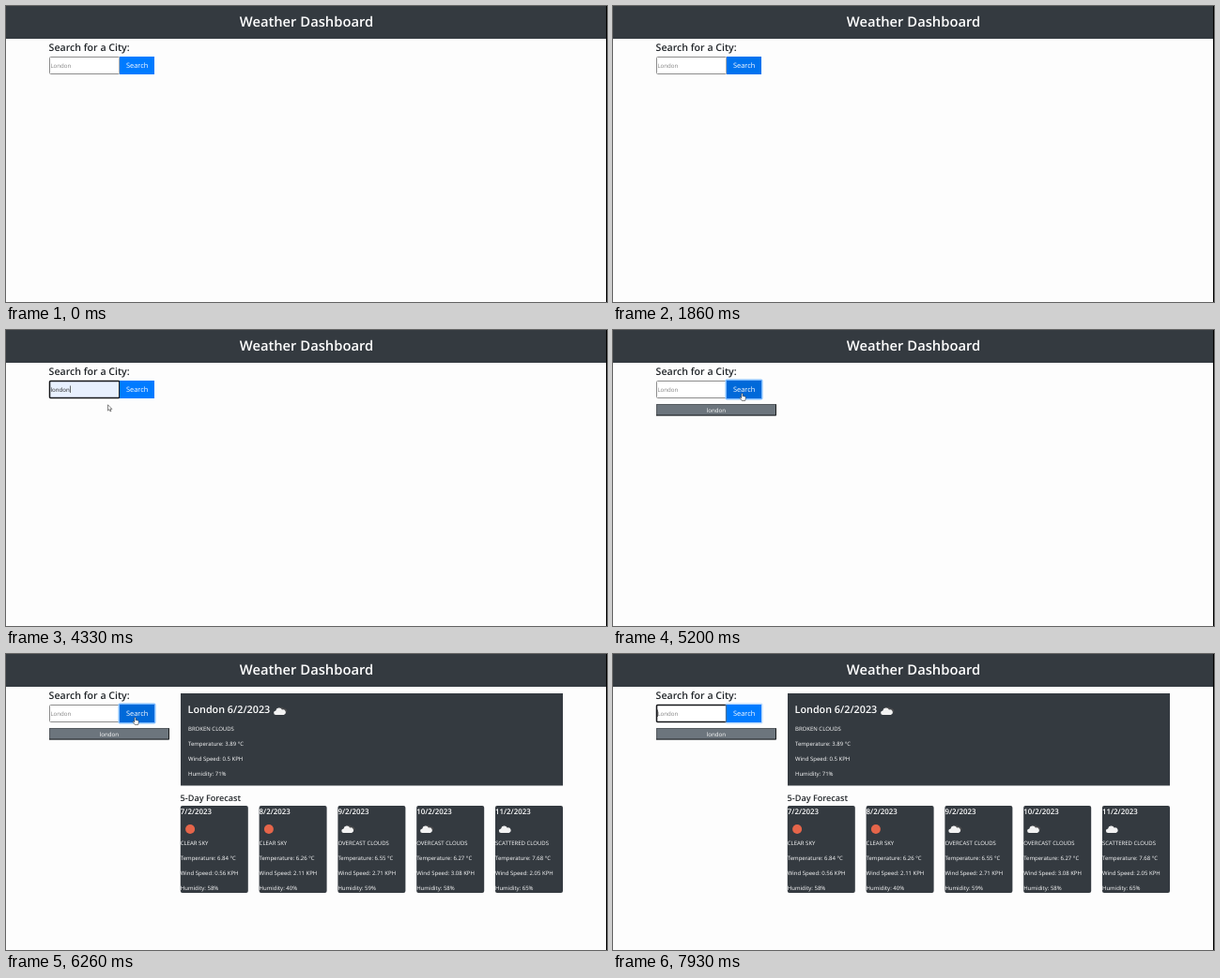
Animation of 640x316 px, one loop 8000 ms. Source, as an HTML page:

```html
<!DOCTYPE html>
<html lang="en">
<head>
<meta charset="utf-8">
<title>Weather Dashboard</title>
<style>
  html, body { margin: 0; width: 100%; height: 100%; overflow: hidden; background: #fdfdfd; }
  svg { display: block; width: 100%; height: 100%; }
  text { font-family: "Open Sans", "Noto Sans", sans-serif; font-size: 6px; fill: #fff; text-rendering: geometricPrecision; white-space: pre; }
  .bold { font-weight: 600; }
  .dark { fill: #212529; }
  .panel { fill: #343a40; }
</style>
</head>
<body>
<svg viewBox="0 0 640 316">
  <rect class="panel" width="640" height="35"/>
  <text class="bold" x="320" y="22" text-anchor="middle" style="font-size:14.75px">Weather Dashboard</text>
  <text class="bold dark" x="45.6" y="48" style="font-size:10.6px">Search for a City:</text>

  <rect id="field" x="46.5" y="54.5" width="74.3" height="18" rx="1"/>
  <text id="entry" x="47.4" y="65.8" style="font-size:6.15px"></text>
  <rect id="caret" y="59.5" width=".6" height="7.5" fill="#111"/>

  <rect id="ring" x="120.3" y="53.3" width="38.4" height="20.4" rx="1" fill="none" stroke="#80bdff" stroke-width="1.6"/>
  <rect id="button" x="121" y="54" width="37" height="19"/>
  <text x="139.6" y="66.3" text-anchor="middle" style="font-size:7.45px">Search</text>

  <g id="history">
    <rect x="46" y="79" width="128" height="12.5" fill="#6c757d"/>
    <path d="M46.5 91V79.5H173.5" fill="none" stroke="#565b60"/>
    <path d="M46 91H173.5V79.5" fill="none" stroke="#1c1f21"/>
    <text x="109.8" y="87.7" text-anchor="middle" style="font-size:6.15px">london</text>
  </g>
  <g id="results"></g>
  <rect x="639" width="1" height="316" fill="#000"/>
  <path id="cursor" fill="#fff" stroke="#222" stroke-width=".55" stroke-linejoin="round"/>
</svg>
<script>
const LOOP = 8000, STEPS_PER_MS = 0.015;
const $ = id => document.getElementById(id);
const [field, entry, caret, ring, button, history_, results, cursor] =
  ['field', 'entry', 'caret', 'ring', 'button', 'history', 'results', 'cursor'].map($);

const text = (x, y, size, content, cls = '') =>
  `<text class="${cls}" x="${x}" y="${y}" style="font-size:${size}px">${content}</text>`;

const cloudPath = 'M-4 4a2.3 2.3 0 0 1-.2-4.6a3.6 3.6 0 0 1 6.7-.9a2.8 2.8 0 0 1 1.8 5.5z';
function icon(kind, x, y) {
  if (kind === 'sun') return `<circle cx="${x}" cy="${y}" r="5" fill="#e5654a"/>`;
  const back = kind === 'clouds'
    ? `<path d="${cloudPath}" transform="translate(${x + 2.3} ${y - 1.3}) scale(.85)" fill="#4a4b4d"/>` : '';
  return back + `<path d="${cloudPath}" transform="translate(${x} ${y})" fill="#f2f2f2"/>`;
}

const report = (x, tops, [sky, temp, wind, humidity]) =>
  [sky, `Temperature: ${temp} °C`, `Wind Speed: ${wind} KPH`, `Humidity: ${humidity}%`]
    .map((line, i) => text(x, tops + 16 * i, 6, line)).join('');

const forecast = [
  ['7/2/2023', 'sun', 'CLEAR SKY', '6.84', '0.56', 58],
  ['8/2/2023', 'sun', 'CLEAR SKY', '6.26', '2.11', 40],
  ['9/2/2023', 'clouds', 'OVERCAST CLOUDS', '6.55', '2.71', 59],
  ['10/2/2023', 'clouds', 'OVERCAST CLOUDS', '6.27', '3.08', 58],
  ['11/2/2023', 'cloud', 'SCATTERED CLOUDS', '7.68', '2.05', 65],
];

results.innerHTML =
  '<rect class="panel" x="186" y="42" width="407" height="98.5"/>' +
  text(193.6, 63, 10.8, 'London 6/2/2023', 'bold') + icon('clouds', 291.5, 61) +
  report(194, 82, ['BROKEN CLOUDS', '3.89', '0.5', 71]) +
  text(185.6, 157, 9.1, '5-Day Forecast', 'bold dark') +
  forecast.map(([date, kind, ...data], i) => {
    const x = 185.8 + 83.8 * i;
    return `<rect class="panel" x="${x}" y="162" width="72" height="93" rx="2"/>` +
      text(x, 171, 7.9, date, 'bold') + icon(kind, x + 10.3, 187) + report(x, 204.2, data);
  }).join('');

const shapes = {
  arrow: 'M0 0V6.3L1.5 4.9L2.5 7.2L3.5 6.8L2.5 4.6H4.4Z',
  hand: 'M-.7 .6Q0-.6 .7 .6V3L3 3.5Q4 3.9 3.8 5L3.2 8H-.2L-2.4 4.9Q-2 4-1.3 4.6L-.7 5.2Z',
};

// Pointer visits: shape, end time, then [time, x, y] points.
const visits = [
  ['arrow', 725, [400, 480, 47], [530, 340, 112], [600, 215, 127], [660, 130, 112], [725, 102, 78]],
  ['hand', 1765, [930, 123, 64], [1060, 138, 65], [1200, 149, 62.5], [1500, 148, 63], [1765, 121, 65]],
  ['arrow', 4590, [4130, 72, 75], [4330, 108, 79.5], [4460, 126, 91], [4590, 135, 76]],
  ['hand', 7530, [4590, 136, 72], [4660, 137.5, 67.5], [7395, 137.5, 67.5], [7530, 122, 65]],
];

// [start, text, style]
const entries = [
  [0, 'London', 'placeholder'], [3255, 'l', 'typed'], [3395, 'lo', 'typed'],
  [3455, 'london', 'filled'], [4860, 'London', 'placeholder'],
];

const between = (t, a, b) => t >= a && t < b;
const ramp = (t, start, length = 150) => Math.min(1, Math.max(0, (t - start) / length));

function placePointer(t) {
  const visit = visits.find(([, end, first]) => between(t, first[0], end));
  cursor.style.display = visit ? '' : 'none';
  if (!visit) return;
  const [shape, , ...points] = visit;
  const i = points.findIndex((p, k) => k && t <= p[0]);
  const [t0, x0, y0] = points[i - 1], [t1, x1, y1] = points[i];
  const k = (t - t0) / (t1 - t0);
  cursor.setAttribute('d', shapes[shape]);
  cursor.setAttribute('transform', `translate(${x0 + (x1 - x0) * k} ${y0 + (y1 - y0) * k})`);
}

function draw(t) {
  const focused = between(t, 2125, 4860) || t >= 7860;
  const [, value, style] = entries.findLast(e => t >= e[0]);
  const filled = style === 'filled', empty = style === 'placeholder';
  field.setAttribute('stroke', focused ? '#15171a' : '#8c8c8c');
  field.setAttribute('stroke-width', focused ? 1.5 : 1);
  field.setAttribute('fill', filled ? '#e8f0fe' : '#fff');
  entry.textContent = value;
  entry.style.fill = empty ? '#808080' : '#222';

  const caretOn = focused && !between(t, 2595, 3255);
  caret.style.display = caretOn ? '' : 'none';
  caret.setAttribute('x', empty ? 47 : 47.8 + entry.getComputedTextLength());

  const hover = ramp(t, 1180) - ramp(t, 1780) + ramp(t, 4590) - ramp(t, 7530);
  button.setAttribute('fill', `rgb(0 ${123 - 18 * hover} ${255 - 38 * hover})`);
  ring.style.opacity = ramp(t, 4800) - ramp(t, 7860);

  history_.style.display = t >= 4925 ? '' : 'none';
  results.style.display = t >= 5255 ? '' : 'none';
  placePointer(t);
}

function frame(now) {
  const step = Math.floor(((now % LOOP) + 7) * STEPS_PER_MS);
  draw((step / STEPS_PER_MS) % LOOP);
  requestAnimationFrame(frame);
}
requestAnimationFrame(frame);
</script>
</body>
</html>
```
